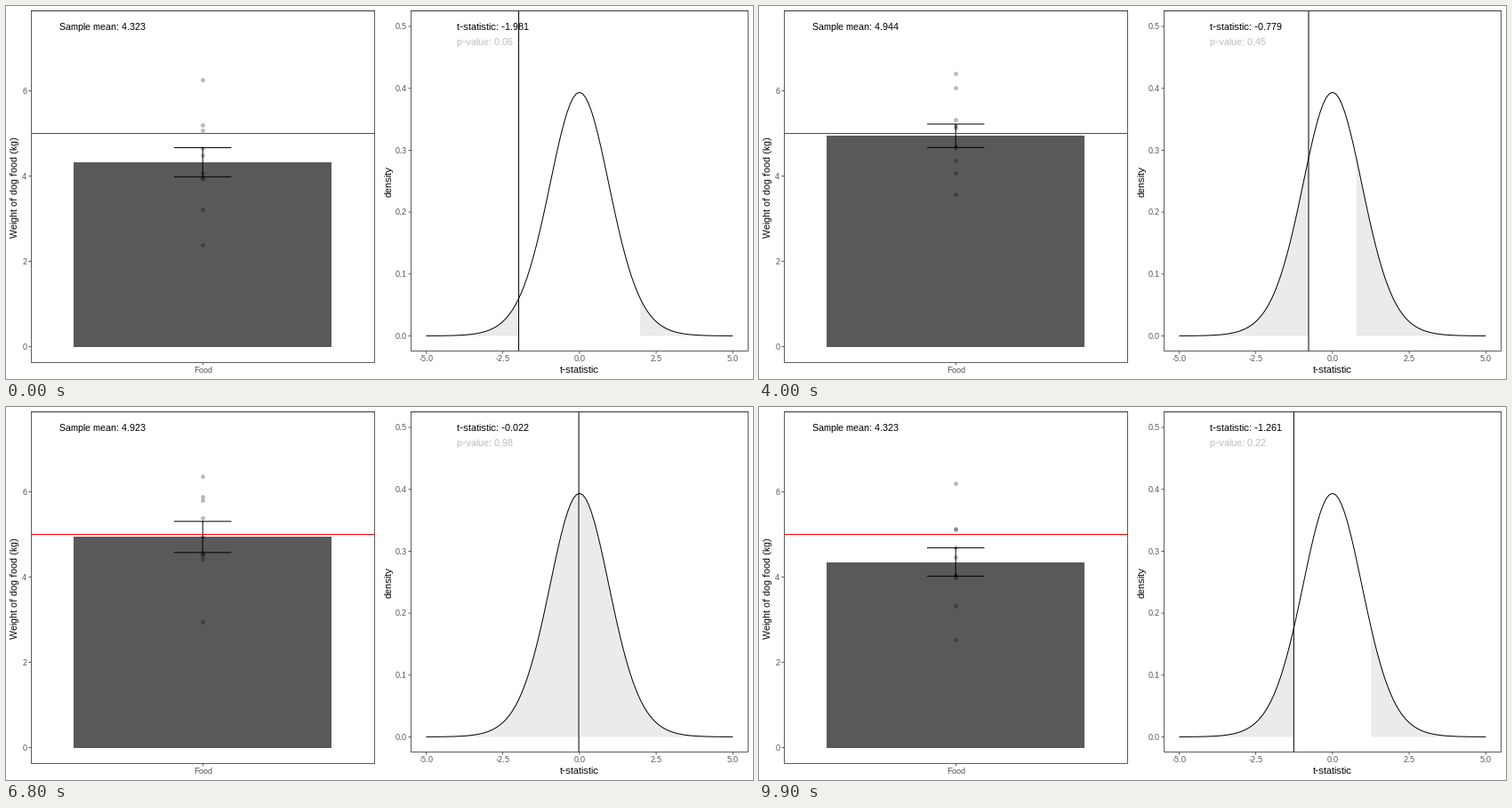
Write a matplotlib script that moves like this. It is 840 px wide and 420 px high and loops after 10 s.

```python
import math

import numpy as np
import matplotlib.pyplot as plt
from matplotlib.animation import FuncAnimation

plt.rcParams["font.family"] = "Liberation Sans"
plt.rcParams["text.hinting"] = "default"
plt.rcParams["text.hinting_factor"] = 1

W, H, DPI = 840, 420, 100
PX = 72 / DPI  # points per pixel
FRAMES, INTERVAL, PER_STATE = 100, 100, 10
MU, DF, N = 5, 18, 10

# Key values of each sample; spread and single weights follow from them
MEANS = np.array([4.323, 5.244, 4.701, 4.740, 4.944, 5.382, 4.990, 4.923, 4.905, 4.768])
TS = np.array([-1.981, 0.717, -0.892, -0.779, -0.204, 1.939, -0.022, -0.230, -0.314, -1.261])
ERRORS = (MEANS - MU) / TS

MID = 221.2  # centre of the bar
BAR_HALF, CAP_HALF = 144.8, 32.2


def weight_y(v):
    return 383.6 - 48.03 * v


def stat_x(t):
    return 644.86 + 34.48 * t


def dens_y(d):
    return 371.5 - 697 * d


def density(t):
    c = math.gamma((DF + 1) / 2) / (math.sqrt(DF * math.pi) * math.gamma(DF / 2))
    return c * (1 + np.asarray(t) ** 2 / DF) ** (-(DF + 1) / 2)


def p_value(t):
    step = 0.002
    mids = np.arange(abs(t), abs(t) + 40, step) + step / 2
    return 2 * step * density(mids).sum()


def draw_weights(rng, mean, err):
    """Bell-shaped random weights with exactly this mean and standard error."""
    q = (np.arange(N) + 0.5) / N
    z = np.log(q / (1 - q)) + rng.normal(0, 0.25, N)
    z = (z - z.mean()) / z.std(ddof=1)
    return mean + err * math.sqrt(N) * rng.permutation(z)


rng = np.random.default_rng(4)
POINTS = np.array([draw_weights(rng, m, e) for m, e in zip(MEANS, ERRORS)])
P_VALUES = [p_value(t) for t in TS]

fig = plt.figure(figsize=(W / DPI, H / DPI), dpi=DPI, facecolor="white")
ax = fig.add_axes([0, 0, 1, 1])
ax.set_xlim(0, W)
ax.set_ylim(H, 0)
ax.axis("off")


def line(xs, ys, color="black", width=1.0, z=2):
    return ax.plot(xs, ys, color=color, lw=width * PX, zorder=z, snap=False,
                   solid_capstyle="butt", solid_joinstyle="miter")[0]


def text(x, y, s, size, color="black", ha="left", rotation=0):
    return ax.text(x, y, s, fontsize=size * PX, color=color, ha=ha, va="baseline",
                   rotation=rotation, rotation_mode="anchor", zorder=3)


def panel(x0, y0, x1, y1):
    line([x0, x1, x1, x0, x0, x1], [y0, y0, y1, y1, y0, y0], "#333333", 0.8, z=4)


def y_tick(x, y, s):
    line([x - 2.75, x], [y, y], "#333333", 0.8)
    text(x - 5, y + 3.1, s, 8.8, "#4D4D4D", "right")


def x_tick(x, y, s):
    line([x, x], [y, y + 2.75], "#333333", 0.8)
    text(x, y + 11.3, s, 8.8, "#4D4D4D", "center")


# Left panel
panel(28.5, 5.5, 414.5, 401.5)
for v in (0, 2, 4, 6):
    y_tick(28.2, weight_y(v), str(v))
x_tick(MID, 401.7, "Food")
text(13.4, 203.6, "Weight of dog food (kg)", 11, ha="center", rotation=90)
bar = ax.fill([0], [0], color="#595959", lw=0, zorder=1)[0]
dots = ax.scatter([MID] * N, POINTS[0], s=(3.9 * PX) ** 2, facecolor="black",
                  edgecolor="black", lw=0.7 * PX, alpha=0.25, zorder=1.5)
error_bar = line([], [])
line([28.5, 414.5], [143.5, 143.5], "red", z=2.5)
mean_text = text(60.2, 27, "", 11.04)

# Right panel
panel(455.5, 5.5, 834.5, 388.5)
for i in range(6):
    y_tick(455.3, dens_y(i / 10), f"{i / 10:.1f}")
for t in np.linspace(-5, 5, 5):
    x_tick(stat_x(t), 388.9, f"{t:.1f}")
text(433.4, 197.3, "density", 11, ha="center", rotation=90)
text(644.9, 412.8, "t-statistic", 11, ha="center")
tails = [ax.fill([0], [0], color="#EBEBEB", lw=0, zorder=1)[0] for _ in range(2)]
grid = np.linspace(-5, 5, 101)
line(stat_x(grid), dens_y(density(grid)))
t_line = line([], [])
t_text = text(507, 27, "", 11.04)
p_text = text(507, 44.3, "", 11.04, "#BEBEBE")


def draw_sample(frame):
    k, step = divmod(frame, PER_STATE)
    nxt = (k + 1) % len(MEANS)
    hold = 3 if k == 0 else 4
    p = max(0, step - hold) / (PER_STATE - hold)
    ease = (1 - math.cos(math.pi * p)) / 2

    def mix(values):
        return values[k] + (values[nxt] - values[k]) * ease

    mean, err = mix(MEANS), mix(ERRORS)
    base, top = weight_y(0), weight_y(mean)
    left, right = MID - BAR_HALF, MID + BAR_HALF
    bar.set_xy([(left, base), (left, top), (right, top), (right, base)])
    dots.set_offsets(np.column_stack([[MID] * N, weight_y(mix(POINTS))]))

    hi, lo = weight_y(mean + err), weight_y(mean - err)
    a, b, gap = MID - CAP_HALF, MID + CAP_HALF, np.nan
    error_bar.set_data([a, b, gap, MID, MID, gap, a, b],
                       [hi, hi, gap, hi, lo, gap, lo, lo])
    mean_text.set_text(f"Sample mean: {MEANS[nxt if p > 0.5 else k]:.3f}")


def draw_test(frame):
    k = max(frame - 1, 0) // PER_STATE
    t = TS[k]
    xs = np.linspace(abs(t), 5, 150)
    ys = dens_y(density(xs))
    for tail, sign in zip(tails, (-1, 1)):
        px = stat_x(sign * xs)
        tail.set_xy(np.column_stack([np.r_[px[0], px, px[-1]],
                                     np.r_[dens_y(0), ys, dens_y(0)]]))
    t_line.set_data([stat_x(t)] * 2, [5.5, 388.5])
    t_text.set_text(f"t-statistic: {t:6.3f}")
    p_text.set_text(f"p-value: {P_VALUES[k]:.2f}")


def update(frame):
    draw_sample(frame)
    draw_test(frame)
    return []


anim = FuncAnimation(fig, update, frames=FRAMES, interval=INTERVAL, repeat=True)
plt.show()
```
